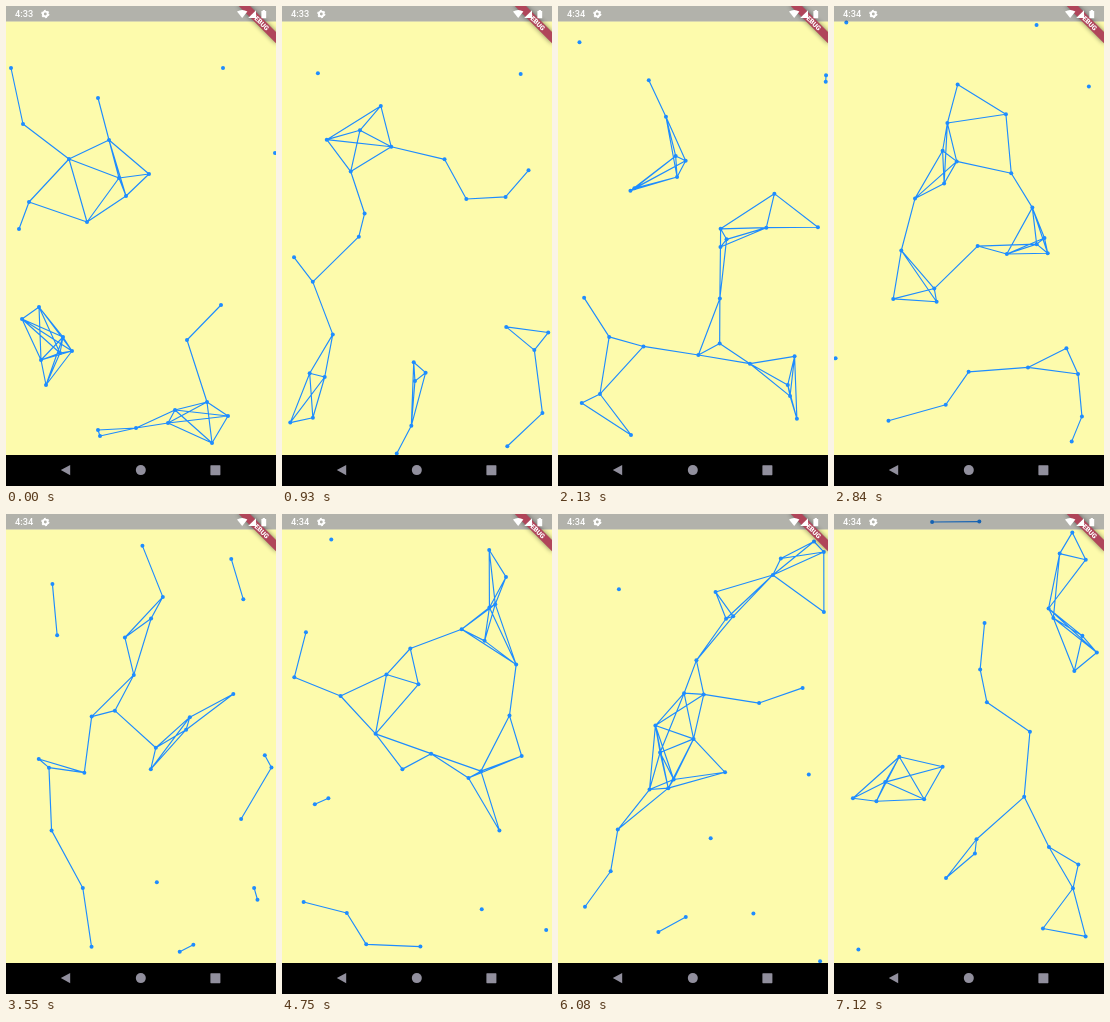
Recreate the animation shown at these times as an HTML page with a canvas. Size 270 by 480 pixels, loop 7160 ms.

```html
<!DOCTYPE html>
<html lang="en">
<head>
<meta charset="utf-8">
<title>Linked particles</title>
<style>
  html, body { margin: 0; width: 100%; height: 100%; overflow: hidden; background: #000; }
  canvas, svg { position: absolute; left: 0; top: 0; width: 270px; height: 480px; display: block; }
  text { font-family: Roboto, "Open Sans", sans-serif; fill: #fff; }
  .clock { font-size: 9.2px; font-weight: 500; }
  .ribbon { font-size: 6.7px; font-weight: 900; text-anchor: middle; }
  .shadow { filter: blur(2.4px); }
</style>
</head>
<body>
<canvas id="net"></canvas>
<svg viewBox="0 0 270 480">
  <rect width="270" height="15.5" opacity=".3"/>
  <g transform="translate(270 0) rotate(45)">
    <rect class="shadow" x="-26.3" y="18.4" width="52.6" height="7.9" opacity=".5"/>
    <rect x="-26.3" y="18.4" width="52.6" height="7.9" fill="#b0455a"/>
    <text class="ribbon" x="0" y="24.7">DEBUG</text>
  </g>

  <text class="clock" id="clock" x="9" y="11.3">4:33</text>
  <g fill="none" stroke="#fff">
    <circle cx="39.3" cy="8" r="2.4" stroke-width="1.9"/>
    <circle cx="39.3" cy="8" r="3.5" stroke-width="1.3" stroke-dasharray="1.85 1.815"/>
  </g>
  <g fill="#fff">
    <path d="M231 5.6Q236.2 2.2 241.4 5.6L236.2 12Z"/>
    <path d="M250 4.2V12H242.2Z"/>
    <path d="M255.4 5H256.7V4.1H258.9V5H260.2V12.2H255.4Z"/>
  </g>

  <rect y="449" width="270" height="31"/>
  <g fill="#918f9d">
    <path d="M54.8 464.1L64.2 458.9V469.3Z"/>
    <circle cx="134.8" cy="464.1" r="5"/>
    <rect x="204.4" y="459.2" width="10" height="10" rx=".6"/>
  </g>
</svg>
<script>
const W = 270, H = 448, LOOP = 7160, FPS = 24;
const REACH = 65.6; // dots closer than this are joined

// Starting state of each dot: x, y, then velocity in px per second
const dots = [
  [5, 62, -45.7, 5.9],      [17, 118, -69, 17.5],     [92, 92, 7.6, 8.9],
  [103, 134, 7, 7.6],       [63, 153, 6.4, 14],       [113, 172, 79.7, 23.5],
  [143, 168, 90, 25.6],     [120, 190, -47, -73.4],   [81, 216, 91.1, -70],
  [23, 196, 66.6, 12.8],    [13, 223, 71.3, 8.6],     [217, 62, 24.2, 6.6],
  [269, 147, -25.1, 19.4],  [33, 301, -50.3, -55.5],  [16, 313, -74.6, 17.2],
  [57, 331, 83.5, 28.2],    [66, 345, -42.8, 24.8],   [54, 347, 88.2, 31.4],
  [35, 354, -73.5, -87.3],  [40, 379, -53.9, 42],     [215, 299, 10.3, 24.5],
  [181, 334, 79.7, 11.3],   [201, 396, 81.3, -77.6],  [169, 404, -60.6, 49.6],
  [162, 417, -36.5, 66.1],  [222, 410, 3.7, 51.1],    [206, 437, 82.2, 58],
  [130, 422, 15.2, -61.8],  [92, 424, -68.3, 67.3],   [94, 430, -57.3, -65.9]
];

const canvas = document.getElementById('net');
const clock = document.getElementById('clock');
const ctx = canvas.getContext('2d');
const scale = Math.max(1, window.devicePixelRatio || 1);
canvas.width = W * scale;
canvas.height = 480 * scale;
ctx.scale(scale, scale);

// Folds an unbounded coordinate into 0..size, as if bouncing off both walls
function bounce(v, size) {
  const m = ((v % (2 * size)) + 2 * size) % (2 * size);
  return size - Math.abs(size - m);
}

// Time in 1/24 s steps; the pace lags a little early in the loop and catches up later
function elapsed(ms) {
  const t = Math.floor(ms * FPS / 1000 + .15) / FPS;
  return t - .03 * Math.sin(2 * Math.PI * t * 1000 / LOOP);
}

function draw(ms) {
  const t = elapsed(ms);
  const pts = dots.map(([x, y, vx, vy]) => [bounce(x + vx * t, W), bounce(y + vy * t, H)]);

  ctx.fillStyle = '#fffff5';
  ctx.fillRect(0, 0, W, 480);
  ctx.fillStyle = '#fdfbac';
  ctx.fillRect(0, 15.5, W, 480);

  ctx.strokeStyle = ctx.fillStyle = '#1e8cff';
  ctx.lineWidth = 1.15;
  ctx.beginPath();
  pts.forEach(([x, y], i) => {
    for (const [u, v] of pts.slice(i + 1)) {
      if (Math.hypot(u - x, v - y) < REACH) {
        ctx.moveTo(x, y);
        ctx.lineTo(u, v);
      }
    }
  });
  ctx.stroke();

  for (const [x, y] of pts) {
    ctx.beginPath();
    ctx.arc(x, y, 2, 0, 2 * Math.PI);
    ctx.fill();
  }

  clock.textContent = ms < 1200 ? '4:33' : '4:34';
}

const start = performance.now();
function tick() {
  draw((performance.now() - start) % LOOP);
  requestAnimationFrame(tick);
}
tick();
</script>
</body>
</html>
```
